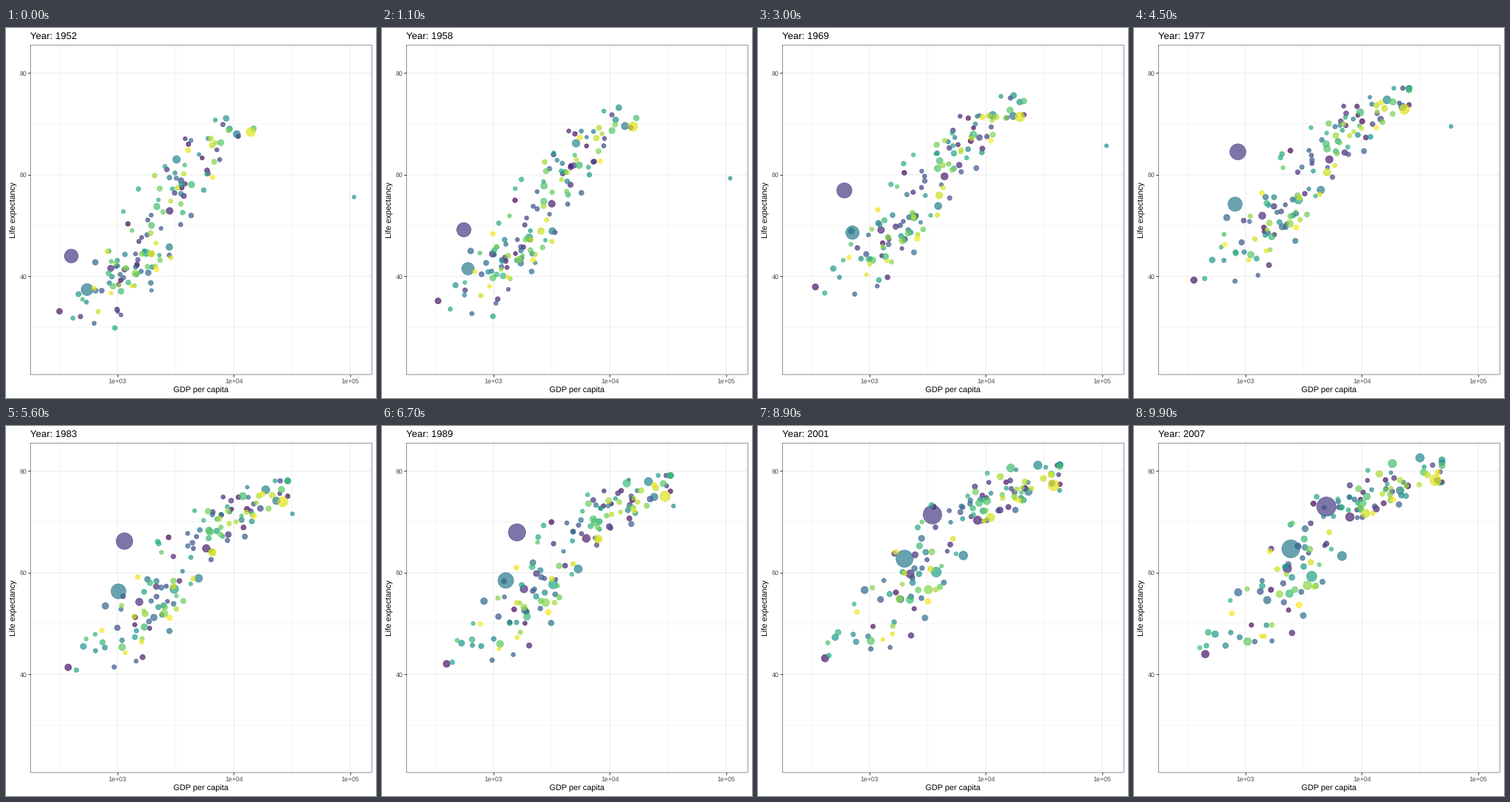
Recreate the animation shown at these times as a matplotlib script. Size 504x504 px, loop 10000 ms.

```python
import numpy as np
import matplotlib.pyplot as plt
from matplotlib.animation import FuncAnimation
from matplotlib.patches import Rectangle

SIZE = 504
LEFT, TOP, WIDTH, HEIGHT = 33, 22.9, 465.5, 449.4
FRAMES = 100
KEYS = np.arange(1952, 2008, 5)
SPAN = np.linspace(0, 1, len(KEYS))
EASE = 1 - (1 - SPAN) ** 1.5
INK, LABEL, GRID = "#333333", "#4D4D4D", "#EBEBEB"

rng = np.random.default_rng(4)
plt.rcParams.update({"font.family": "Liberation Sans", "text.hinting": "none"})

# Bubbles that stand out, by colour rank:
# (millions at start, at end, [(year, income, life), ...])
LEADS = {
    24: (556, 1319, [(1952, 400, 44), (1957, 576, 50.5), (1962, 488, 44.5),
                     (1972, 677, 63.1), (1987, 1379, 67.3), (2007, 4959, 73)]),
    58: (372, 1110, [(1952, 547, 37.4), (1977, 813, 54.2), (2007, 2452, 64.7)]),
    66: (86, 127, [(1952, 3217, 63), (1972, 14779, 73.4), (2007, 31656, 82.6)]),
    71: (0.16, 2.5, [(1952, 108382, 55.6), (1972, 109348, 67.7),
                     (1982, 31354, 71.3), (2007, 47307, 77.6)]),
    134: (157, 301, [(1952, 13990, 68.4), (2007, 42952, 78.2)]),
}

# Start and end of each region's cloud: count, income, life, life spread, growth
REGIONS = [
    (52, (1000, 1500), (39, 54), (4.5, 7.5), 3.3),
    (24, (3000, 8600), (53.5, 73.2), (8, 3.5), 2.4),
    (29, (1500, 5200), (46.5, 70.5), (8, 5.5), 2.8),
    (32, (5500, 25500), (65, 77.8), (4.5, 2.4), 1.35),
]


def drift(n):
    """Standard scores that turn slowly towards a second draw."""
    a, b = rng.normal(size=(2, n))
    turn = 0.7 * SPAN[:, None]
    z = np.cos(turn) * a + np.sin(turn) * b + 0.07 * rng.normal(size=(len(KEYS), n))
    return 2.4 * np.tanh(z / 2.4).T


def cloud(n, income, life, tall, growth):
    wealth = drift(n)
    health = 0.72 * wealth + 0.69 * drift(n)
    health -= 0.15 * (health ** 2 - 1) * (1 - SPAN)
    lo, hi = np.log10(income)
    x = lo + (hi - lo) * EASE + (0.26 + 0.08 * SPAN) * wealth
    y = life[0] + (life[1] - life[0]) * EASE + np.linspace(*tall, len(KEYS)) * health
    x = np.minimum(x, 4.17 + 0.52 * SPAN)
    y = np.minimum(y, 72.7 + 9.5 * SPAN)
    start = np.clip(4 * np.exp(1.3 * rng.normal(size=(n, 1))), 0.06, 80)
    return np.stack([x, y, start * growth ** SPAN], axis=-1)


def lead(first, last, knots):
    year, income, life = np.array(knots).T
    return np.stack([np.interp(KEYS, year, np.log10(income)),
                     np.interp(KEYS, year, life),
                     first * (last / first) ** SPAN], axis=-1)


def build():
    total = len(LEADS) + sum(r[0] for r in REGIONS)
    tracks = np.empty((total, len(KEYS), 3))
    rest = rng.permutation([i for i in range(total) if i not in LEADS])
    tracks[rest] = np.concatenate([cloud(*r) for r in REGIONS])
    for rank, row in LEADS.items():
        tracks[rank] = lead(*row)
    # Population becomes a marker diameter in pixels
    share = np.clip(tracks[..., 2] / 1319, 0, 1)
    tracks[..., 2] = 0.75 * ((2 + 10 * np.sqrt(share)) * 2.845 + 0.945)
    return tracks


def state(year):
    pos = (year - KEYS[0]) / 5
    k = min(int(pos), len(KEYS) - 2)
    f = pos - k
    return (1 - f) * TRACKS[:, k] + f * TRACKS[:, k + 1]


TRACKS = build()

fig = plt.figure(figsize=(SIZE / 72, SIZE / 72), dpi=72, facecolor="white")
ax = fig.add_axes([LEFT / SIZE, 1 - (TOP + HEIGHT) / SIZE,
                   WIDTH / SIZE, HEIGHT / SIZE])
ax.set_xlim(2.2487, 5.1887)
ax.set_ylim(20.649, 85.553)
ax.spines[:].set_visible(False)

for lines, xs, ys, lw in (("minor", (2.5, 3.5, 4.5), (30, 50, 70), 0.53),
                          ("major", (3, 4, 5), (40, 60, 80), 1.07)):
    style = dict(color=GRID, lw=lw, zorder=0.5 * (lines == "major"), snap=False)
    for x in xs:
        ax.axvline(x, **style)
    for y in ys:
        ax.axhline(y, **style)

ax.set_xticks([3, 4, 5], ["1e+03", "1e+04", "1e+05"])
ax.set_yticks([40, 60, 80], ["40", "60", "80"])
ax.tick_params(length=2.75, width=1.07, pad=2.2, color=INK,
               labelcolor=LABEL, labelsize=8.8)

# Thin border that lies just inside the panel
dx, dy = 0.27 / WIDTH, 0.27 / HEIGHT
ax.add_patch(Rectangle((dx, dy), 1 - 2 * dx, 1 - 2 * dy, transform=ax.transAxes,
                       fill=False, ec=INK, lw=0.54, zorder=5,
                       snap=False, clip_on=False))


def write(x, y, text, size, **kw):
    return fig.text(x / SIZE, 1 - y / SIZE, text, size=size, color="black",
                    va="baseline", **kw)


title = write(LEFT, 15, "Year: 1952", 13.2)
write(LEFT + WIDTH / 2, 497, "GDP per capita", 11, ha="center")
write(13.4, TOP + HEIGHT / 2, "Life expectancy", 11, ha="center",
      rotation=90, rotation_mode="anchor")

now = state(KEYS[0])
colors = plt.get_cmap("viridis")(np.linspace(0, 1, len(TRACKS)))
colors[:, 3] = 0.7
dots = ax.scatter(now[:, 0], now[:, 1], s=now[:, 2] ** 2, c=colors,
                  edgecolors=colors, linewidths=0.71, zorder=2)


def draw(i):
    year = 1952 + 55 * i / (FRAMES - 1)
    now = state(year)
    dots.set_offsets(now[:, :2])
    dots.set_sizes(now[:, 2] ** 2)
    title.set_text(f"Year: {round(year)}")
    return dots, title


anim = FuncAnimation(fig, draw, frames=FRAMES, interval=100, repeat=True,
                     repeat_delay=0, blit=False)
plt.show()
```
